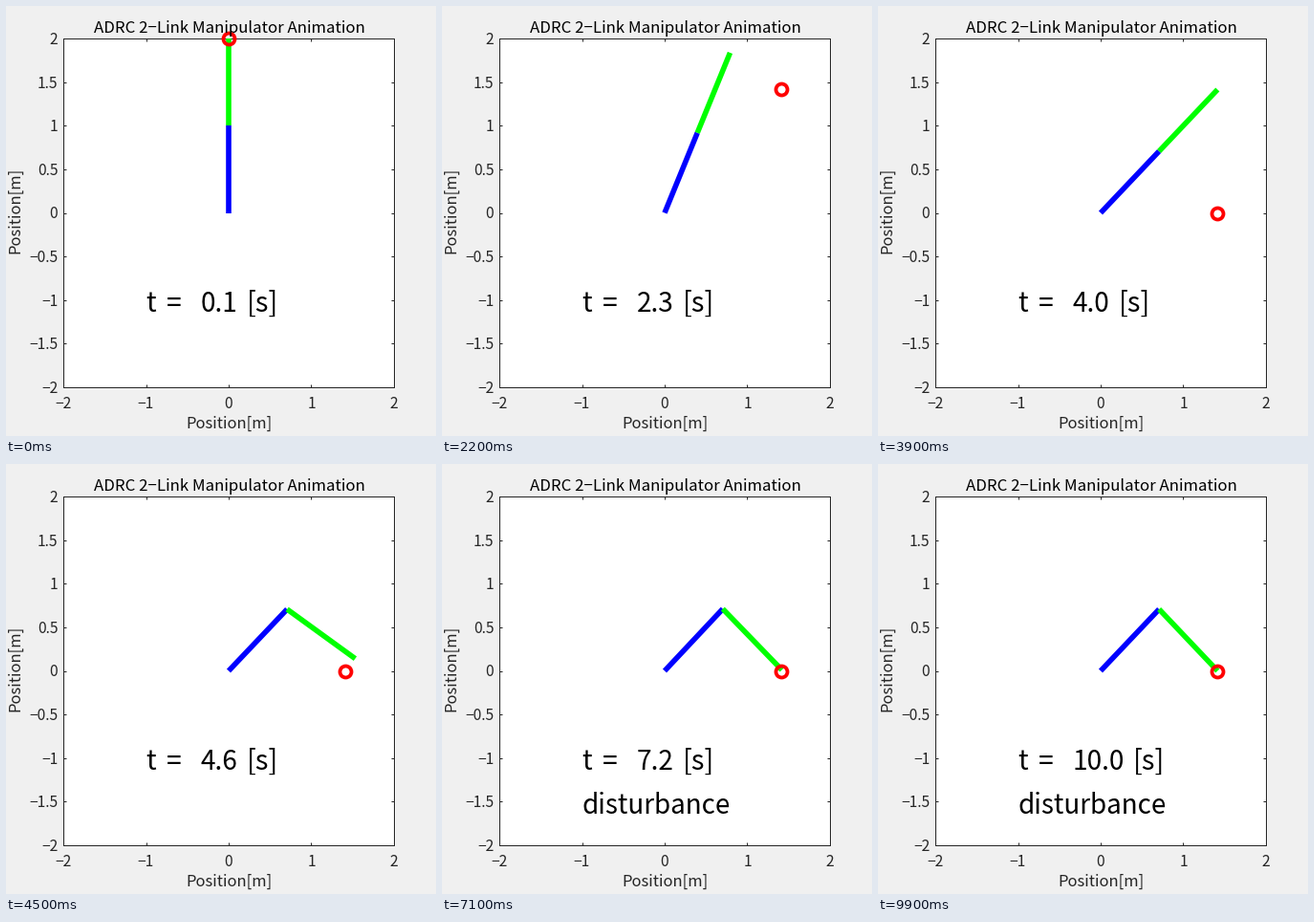
A matplotlib script for the animation above (10000 ms loop, 450x450 px).

```python
import numpy as np
import matplotlib.pyplot as plt
from matplotlib.animation import FuncAnimation

SIZE, DPI = 450, 72          # at 72 dpi one point is one pixel
LEFT, RIGHT, TOP, BOTTOM = 60, 406, 34, 399
FRAMES, INTERVAL = 100, 100
INK = "#262626"

plt.rcParams["font.family"] = "Noto Sans CJK JP"
fig = plt.figure(figsize=(SIZE / DPI, SIZE / DPI), dpi=DPI, facecolor="#f0f0f0")
ax = fig.add_axes([LEFT / SIZE, 1 - BOTTOM / SIZE,
                   (RIGHT - LEFT) / SIZE, (BOTTOM - TOP) / SIZE])
ax.set(xlim=(-2, 2), ylim=(-2, 2),
       xticks=np.arange(-2, 3), yticks=np.arange(-2, 2.5, 0.5))
ax.tick_params(direction="in", length=3, width=1, color=INK, top=True,
               right=True, labelbottom=False, labelleft=False)
for spine in ax.spines.values():
    spine.set(color=INK, linewidth=1)


def label(x, y, text, size, ha="center", color="black", **kw):
    """Text with its baseline at pixel (x, y), counted from the top left."""
    return fig.text(x / SIZE, 1 - y / SIZE, text, fontsize=size, ha=ha,
                    va="baseline", color=color, **kw)


def tick_text(v):
    return f"{v:g}".replace("-", "\u2212")


label(233.5, 28.3, "ADRC 2\u2212Link Manipulator Animation", 16.8)
label(234, 441.5, "Position[m]", 16.6, color=INK)
label(14.5, 214, "Position[m]", 16.6, color=INK, rotation=90,
      rotation_mode="anchor")
for v in ax.get_xticks():
    label(LEFT + (v + 2) / 4 * (RIGHT - LEFT), 421, tick_text(v), 15.6, color=INK)
for v in ax.get_yticks():
    label(54.3, BOTTOM - (v + 2) / 4 * (BOTTOM - TOP) + 6, tick_text(v), 15.6,
          ha="right", color=INK)

label(146, 319.5, "t", 28, ha="left")
label(176, 319.5, "=", 28)
clock = label(203.8, 319.5, "", 28, ha="left")
unit = label(251.5, 319.5, "[s]", 29, ha="left")
notice = label(146.5, 365.5, "disturbance", 27.8, ha="left")

link_style = dict(linewidth=5.6, solid_capstyle="butt", clip_on=False)
upper, = ax.plot([], [], color="#0000ff", zorder=3, **link_style)
lower, = ax.plot([], [], color="#00ff00", zorder=4, **link_style)
goal, = ax.plot([], [], "o", markersize=12, markerfacecolor="none",
                markeredgecolor="#ff0000", markeredgewidth=3.8,
                clip_on=False, zorder=5)


def settle(t, start, rate=6.53, lag=0.034):
    """Critically damped step response from 0 to 1."""
    x = rate * max(t - start - lag, 0)
    return 1 - (1 + x) * np.exp(-x)


def kick(t, start=7.0, rate=4.0):
    """Small push that the controller rejects."""
    x = rate * max(t - start, 0)
    return x * np.exp(1 - x)


def unit_vec(angle):
    return np.array([np.cos(angle), np.sin(angle)])


def update(i):
    tenths = i + 1
    t = tenths / 10
    q1 = np.pi / 2 - np.pi / 4 * settle(t, 2) + np.radians(0.3) * kick(t)
    q2 = -np.pi / 2 * settle(t, 4) + np.radians(0.3) * kick(t)
    elbow = unit_vec(q1)
    tip = elbow + unit_vec(q1 + q2)
    upper.set_data([0, elbow[0]], [0, elbow[1]])
    lower.set_data([elbow[0], tip[0]], [elbow[1], tip[1]])

    r = np.sqrt(2)
    gx, gy = (0, 2) if tenths < 20 else (r, r) if tenths < 40 else (r, 0)
    goal.set_data([gx], [gy])

    clock.set_text(f"{t:.1f}")
    unit.set_x((251.5 + 15.5 * (t >= 10)) / SIZE)
    notice.set_visible(tenths >= 70)
    return upper, lower, goal, clock, unit, notice


anim = FuncAnimation(fig, update, frames=FRAMES, interval=INTERVAL,
                     repeat=True, repeat_delay=0, blit=False)
plt.show()
```
